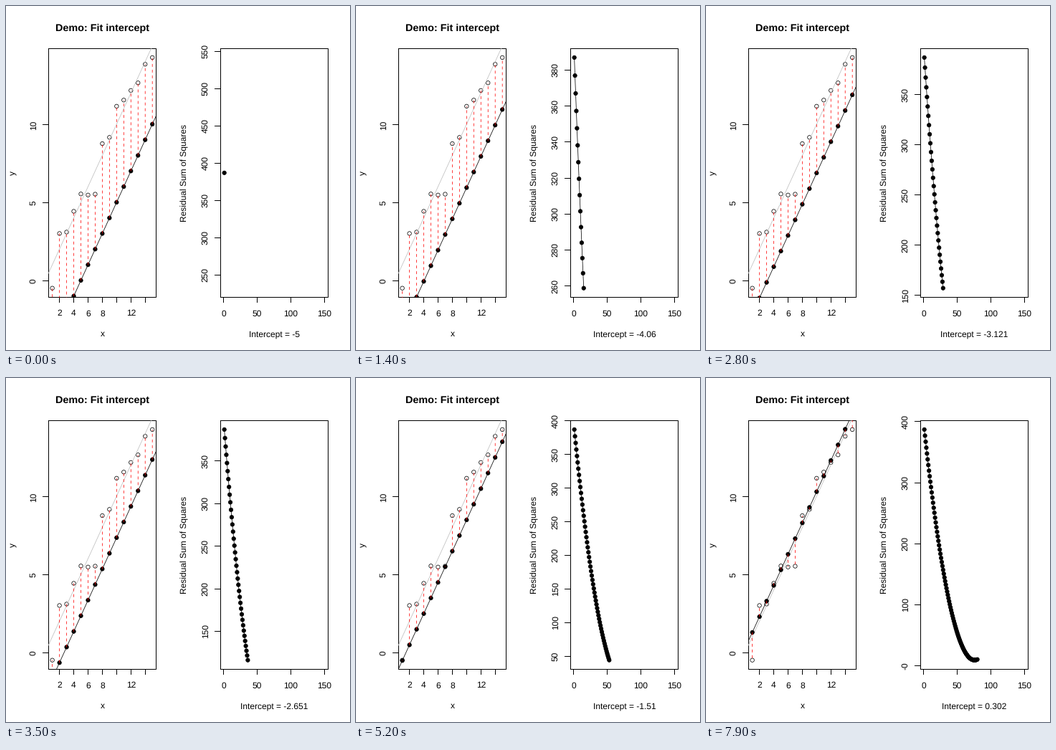
Write a matplotlib script that moves like this. It is 480x480 px and loops after 8000 ms.

```python
import numpy as np
import matplotlib.pyplot as plt
from matplotlib.animation import FuncAnimation
from matplotlib.collections import LineCollection
from matplotlib.patches import PathPatch, Rectangle
from matplotlib.path import Path

plt.rcParams.update({
    "font.family": "Liberation Sans",
    "font.size": 12,
    "text.hinting": "none",
    "lines.scale_dashes": False,
})

SIZE, FRAMES, STEPS = 480, 80, 150
LINE = 14.4                      # height of one margin line
TOP, BOTTOM, WIDTH = 59.04, 406.56, 150.72
MID = (TOP + BOTTOM) / 2
THIN, RADIUS = 0.75, 2.7

# Observations, least squares fit and the trial intercepts
x = np.arange(1, 16)
y = np.array([-0.48, 3.028, 3.12, 4.453, 5.566, 5.497, 5.553, 8.798,
              9.198, 11.198, 11.593, 12.21, 12.697, 13.893, 14.323])
slope, best = np.polyfit(x, y, 1)
trials = np.linspace(-5, 5, STEPS)
rss = np.array([np.sum((y - a - slope * x) ** 2) for a in trials])

fig = plt.figure(figsize=(SIZE / 72, SIZE / 72), dpi=72, facecolor="white")
ax = fig.add_axes([0, 0, 1, 1])
ax.set(xlim=(0, SIZE), ylim=(SIZE, 0))
ax.axis("off")


def padded(lo, hi):
    if lo == hi:
        lo, hi = 0.6 * lo, 1.4 * hi
    pad = 0.04 * (hi - lo)
    return lo - pad, hi + pad


def pretty(lo, hi):
    """Round tick positions, about five of them."""
    cell = (hi - lo) / 5
    base = 10 ** np.floor(np.log10(cell))
    unit = base
    for factor, bias in ((2, 0.8), (5, 1.7), (10, 0.8)):
        if factor * base - cell >= bias * (cell - unit):
            break
        unit = factor * base
    return np.arange(np.ceil(lo / unit), np.floor(hi / unit) + 1) * unit


def label(px, py, text, rotation=0, **style):
    return ax.text(px, py, text, rotation=rotation, ha="center",
                   va="baseline", rotation_mode="anchor", **style)


def rule(xs, ys):
    """Crisp one-pixel line."""
    xs, ys = np.floor(xs) + 0.5, np.floor(ys) + 0.5
    return ax.plot(xs, ys, color="black", lw=1, snap=False,
                   solid_capstyle="projecting")[0]


class Panel:
    def __init__(self, left, xr, yr):
        self.left, self.right = left, left + WIDTH
        self.xr, self.yr = padded(*xr), padded(*yr)
        self.clip = Rectangle((left, TOP), WIDTH, BOTTOM - TOP,
                              transform=ax.transData)
        l, r = self.left, self.right
        rule(np.array([l, r, r, l, l]),
             np.array([TOP, TOP, BOTTOM, BOTTOM, TOP]))

    def px(self, v):
        lo, hi = self.xr
        return self.left + (np.asarray(v) - lo) / (hi - lo) * WIDTH

    def py(self, v):
        lo, hi = self.yr
        return BOTTOM - (np.asarray(v) - lo) / (hi - lo) * (BOTTOM - TOP)

    def x_axis(self, ticks, shown):
        for t in ticks:
            p = self.px(t)
            rule(np.array([p, p]), np.array([BOTTOM, BOTTOM + LINE / 2]))
            if t in shown:
                label(p, BOTTOM + 1.8 * LINE, f"{t}")

    def y_axis(self, ticks):
        parts = []
        for t in ticks:
            p = self.py(t)
            parts.append(rule(np.array([self.left - LINE / 2, self.left]),
                              np.array([p, p])))
            parts.append(label(self.left - 1.2 * LINE, p, f"{t:.0f}", 90))
        return parts

    def x_title(self, text):
        return label(self.left + WIDTH / 2, BOTTOM + 3.8 * LINE, text)

    def y_title(self, text):
        return label(self.left - 3.2 * LINE, MID, text, 90)

    def curve(self, xs, ys, color="black"):
        line, = ax.plot(self.px(xs), self.py(ys), color=color, lw=THIN,
                        snap=False)
        line.set_clip_path(self.clip)
        return line

    def dots(self, xs, ys, fill):
        rings = [Path.circle(c, RADIUS) for c in zip(self.px(xs), self.py(ys))]
        patch = PathPatch(Path.make_compound_path(*rings), facecolor=fill,
                          edgecolor="black", lw=THIN, snap=False, zorder=2)
        ax.add_patch(patch)
        patch.set_clip_path(self.clip)
        return patch

    def dashes(self, xs, start, end):
        px = self.px(xs)
        pairs = [[(a, b), (a, c)]
                 for a, b, c in zip(px, self.py(start), self.py(end))]
        lines = LineCollection(pairs, colors="red", linewidths=THIN,
                               linestyles=[(0, (4, 4))], zorder=2)
        lines.set_snap(False)
        ax.add_collection(lines, autolim=False)
        lines.set_clip_path(self.clip)
        return lines


fit = Panel(59.04, (1, 15), (y.min(), y.max()))
loss = Panel(299.04, (1, STEPS), (0, 1))
ends = np.array(fit.xr)

label(fit.left + WIDTH / 2, 34.7, "Demo: Fit intercept",
      fontsize=14.4, fontweight="bold")
fit.x_axis(range(2, 15, 2), (2, 4, 6, 8, 12))
fit.y_axis((0, 5, 10))
fit.x_title("x")
fit.y_title("y")
fit.dots(x, y, "none")
fit.curve(ends, best + slope * ends, "#bebebe")
loss.x_axis((0, 50, 100, 150), (0, 50, 100, 150))
loss.y_title("Residual Sum of Squares")

moving = []


def update(i):
    while moving:
        moving.pop().remove()
    a = trials[i]
    guess = a + slope * x
    moving.append(fit.curve(ends, a + slope * ends))
    moving.append(fit.dots(x, guess, "black"))
    moving.append(fit.dashes(x, guess, y))

    seen = rss[:i + 1]
    steps = np.arange(1, i + 2)
    loss.yr = padded(seen.min(), seen.max())
    moving.extend(loss.y_axis(pretty(*loss.yr)))
    moving.append(loss.curve(steps, seen))
    moving.append(loss.dots(steps, seen, "black"))
    moving.append(loss.x_title(f"Intercept = {round(a, 3):g}"))
    return moving


anim = FuncAnimation(fig, update, frames=FRAMES, interval=100,
                     init_func=lambda: [], repeat=True, repeat_delay=0)
plt.show()
```
